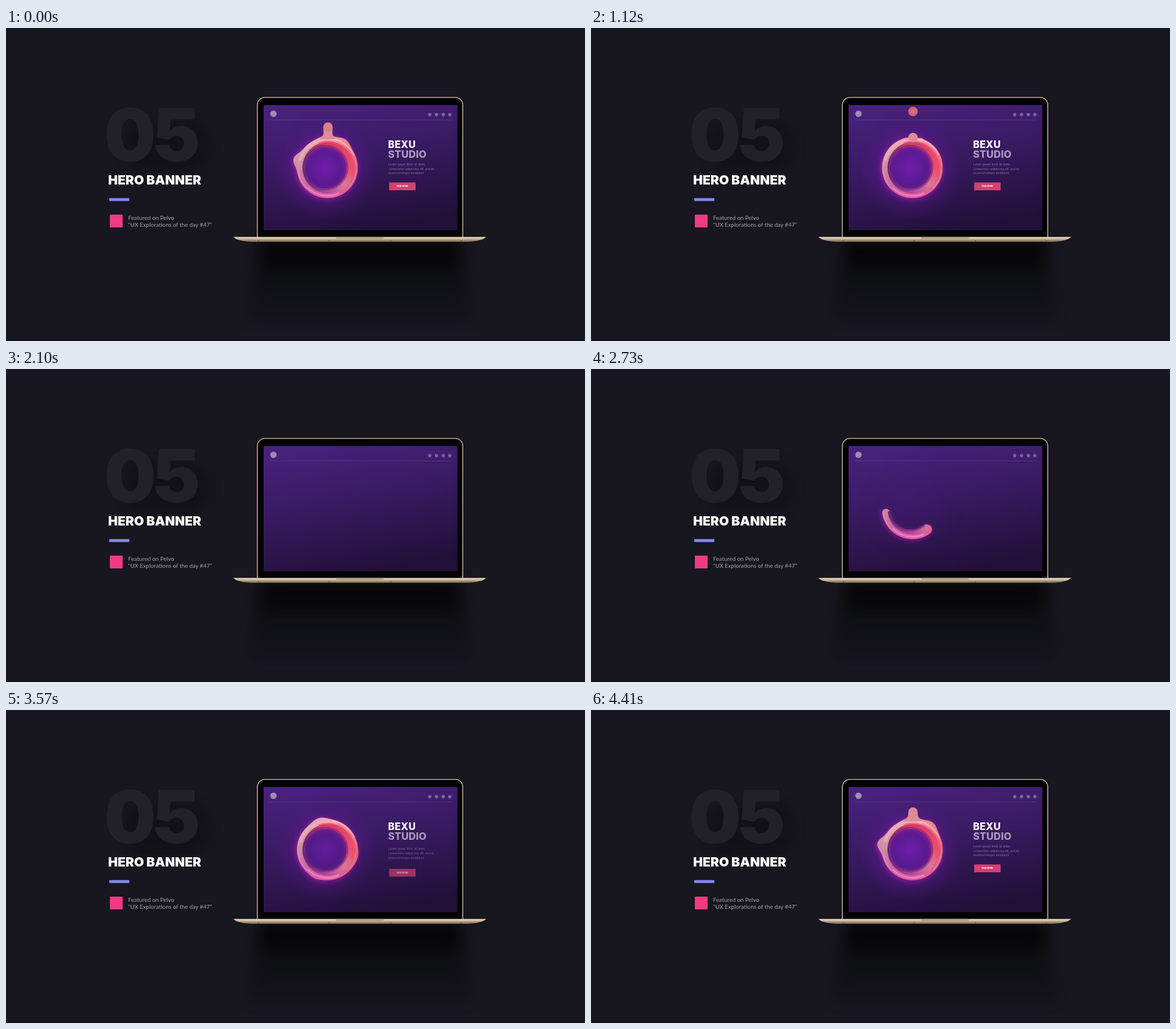
An HTML page with a canvas for the animation above (4.48 s loop, 998x540 px).

```html
<!DOCTYPE html>
<html lang="en">
<head>
<meta charset="utf-8">
<title>Hero banner</title>
<style>
  html, body { margin: 0; width: 100%; height: 100%; overflow: hidden; background: #18161f; }
  svg, canvas { position: absolute; left: 0; top: 0; }
  canvas { left: 444px; top: 133px; }
  text { font-family: Inter, sans-serif; }
  .note { font: 10px Lato, sans-serif; fill: #a3a1a6; }
  .bold { font-weight: 800; }
  .black { font-weight: 900; }
</style>
</head>
<body>
<svg width="998" height="540" viewBox="0 0 998 540">
  <defs>
    <linearGradient id="screen" x1=".3" y1="0" x2=".62" y2="1">
      <stop offset="0" stop-color="#48217b"/>
      <stop offset=".45" stop-color="#381a61"/>
      <stop offset="1" stop-color="#211037"/>
    </linearGradient>
    <linearGradient id="base" x1="0" y1="0" x2="0" y2="1">
      <stop offset="0" stop-color="#efe0c8"/>
      <stop offset=".4" stop-color="#cbb697"/>
      <stop offset="1" stop-color="#6b5d48"/>
    </linearGradient>
    <linearGradient id="fall" x1="0" y1="0" x2="0" y2="1">
      <stop offset="0" stop-color="#060609" stop-opacity=".95"/>
      <stop offset=".45" stop-color="#0d0e12" stop-opacity=".85"/>
      <stop offset="1" stop-color="#121217" stop-opacity=".6"/>
    </linearGradient>
    <filter id="soft" x="-30%" y="-60%" width="160%" height="220%" color-interpolation-filters="sRGB">
      <feGaussianBlur stdDeviation="10"/>
    </filter>
  </defs>

  <g filter="url(#soft)">
    <rect x="205" y="165" width="142" height="80" rx="30" fill="#0f1015" opacity=".7"/>
    <path d="M436 366H784L802 502H418z" fill="url(#fall)"/>
    <rect x="448" y="372" width="324" height="46" rx="16" fill="#050508" opacity=".6"/>
  </g>
  <rect y="538" width="998" height="2" fill="#100f15"/>

  <text class="black" x="169" y="230" font-size="126" letter-spacing="-5" fill="#22212a">05</text>
  <text class="black" x="176" y="270" font-size="22" fill="#fff">HERO BANNER</text>
  <rect x="178" y="293.5" width="34.5" height="5" fill="#8289f7"/>
  <rect x="179" y="322" width="22" height="22" rx="1" fill="#f03b82"/>
  <text class="note" x="210.5" y="331">Featured on Pelvo</text>
  <text class="note" x="210.5" y="342.5">“UX Explorations of the day #47”</text>

  <path d="M433.300 362V132.700a13 13 0 0 1 13-13H774.300a13 13 0 0 1 13 13V362z" fill="#020203" stroke="#c5ae90" stroke-width="1.6"/>
  <rect x="444" y="133" width="334" height="216" fill="url(#screen)"/>
  <path d="M392 360.500H827.500Q822 367 797 369H422Q397 367 392 360.500z" fill="url(#base)"/>
  <path d="M569 360.500H651V362Q651 363.500 649 363.500H571Q569 363.500 569 362z" fill="#b09b7d"/>
  <path d="M434 367h2M556 367h2M662 367h2M784 367h2" stroke="#4d4337"/>

  <circle cx="461" cy="148" r="5.5" fill="#9c8db3"/>
  <path d="M455 158.500H768" stroke="#8d78aa" stroke-opacity=".35" stroke-width=".8"/>
  <g fill="#78659a">
    <circle cx="730.500" cy="149.500" r="2.900"/>
    <circle cx="742" cy="149.500" r="2.900"/>
    <circle cx="753.700" cy="149.500" r="2.900"/>
    <circle cx="765" cy="149.500" r="2.900"/>
  </g>

  <g id="title" class="bold" font-size="17" letter-spacing=".2">
    <text x="658.500" y="206.500" fill="#fff">BEXU</text>
    <text x="658.500" y="223.500" fill="#a89cba">STUDIO</text>
  </g>
  <g id="copy" font-size="4.9" fill="#8a7aa2">
    <text x="659" y="237">Lorem ipsum dolor sit amet,</text>
    <text x="659" y="244.700">consectetur adipiscing elit, sed do</text>
    <text x="659" y="252.300">eiusmod tempor incididunt</text>
  </g>
  <g id="button">
    <rect x="660.500" y="266.500" width="45.500" height="13.500" fill="#d73f70"/>
    <text class="bold" x="683.300" y="274.300" font-size="3.300" fill="#fff" text-anchor="middle">READ MORE</text>
  </g>
</svg>
<canvas width="334" height="216"></canvas>

<script>
const LOOP = 4480, STEP = 70, CX = 554, CY = 241, START = 55;
const ctx = document.querySelector('canvas').getContext('2d');
const byId = id => document.getElementById(id);
const rad = deg => deg * Math.PI / 180;
const ramp = (t, from, to) => Math.min(1, Math.max(0, (t - from) / (to - from)));

// Linear interpolation through [time, value] pairs.
function track(t, ...keys) {
  let value = keys[0][1];
  for (let i = 1; i < keys.length; i++) {
    const [t0, v0] = keys[i - 1], [t1, v1] = keys[i];
    if (t >= t0) value = v0 + (v1 - v0) * ramp(t, t0, t1);
  }
  return value;
}

// Colours run clockwise from the right-hand side.
function conic(...colors) {
  const g = ctx.createConicGradient(0, CX, CY);
  colors.forEach((c, i) => g.addColorStop(i / colors.length, c));
  g.addColorStop(1, colors[0]);
  return g;
}

function radial(x, y, r, ...stops) {
  const g = ctx.createRadialGradient(x, y, 0, x, y, r);
  stops.forEach(([at, color]) => g.addColorStop(at, color));
  return g;
}

const skin = conic('#dd5573', '#e2628c', '#e45aa8', '#cf62a4', '#c98aa2', '#dfa3ae', '#eda3ac', '#ea7f8c');
const wall = conic('#e8506f', '#d9789c', '#b04a9c', '#7d3484', '#6b2e72', '#9c3568', '#d43a62', '#e2436a');

const point = (a, r) => [CX + r * Math.cos(rad(a)), CY + r * Math.sin(rad(a))];
const hole = a => 36.5 - 3 * Math.cos(rad(a));

function bump(a, center, width, height) {
  const d = (a - center + 540) % 360 - 180;
  return height * Math.exp(-d * d / (width * width));
}

// Ribbon between two radius functions, with round ends while it is open.
function band(a0, a1, inner, outer, fill) {
  ctx.beginPath();
  for (let a = a0; a <= a1; a += 1) ctx.lineTo(...point(a, outer(a)));
  for (let a = a1; a >= a0; a -= 1) ctx.lineTo(...point(a, inner(a)));
  ctx.closePath();
  if (a1 - a0 < 360) for (const a of [a0, a1]) {
    const [x, y] = point(a, (inner(a) + outer(a)) / 2), r = (outer(a) - inner(a)) / 2;
    ctx.moveTo(x + r, y);
    ctx.arc(x, y, r, 0, 7);
  }
  ctx.fillStyle = fill;
  ctx.fill();
}

function shine(a0, a1, from, to, r, color, width) {
  from = Math.max(a0, from);
  to = Math.min(a1, to);
  if (from >= to) return;
  ctx.beginPath();
  ctx.arc(CX, CY, r, rad(from), rad(to));
  ctx.strokeStyle = color;
  ctx.lineWidth = width;
  ctx.stroke();
}

// A bead swells out of the ring's top, pinches off and drifts upwards.
function bead(u, c) {
  const age = u - c;
  if (age < -280 || age > 830 || u > 6560) return;
  const y = 171 - (age < 0 ? age * .075 : age * .06);
  const neck = track(age, [-280, 10], [-70, 8], [0, 5], [35, 2], [80, 0]);
  const r = 8.2, x = CX + 1, fade = 1 - ramp(u, 6400, 6560);
  ctx.globalAlpha = fade;
  ctx.fillStyle = '#dd8b98';
  if (neck > 0) {
    ctx.beginPath();
    ctx.moveTo(x - r, y);
    ctx.bezierCurveTo(x - r, y + 10, x - neck, 183, x - neck - 9, 192);
    ctx.lineTo(x + neck + 9, 192);
    ctx.bezierCurveTo(x + neck, 183, x + r, y + 10, x + r, y);
    ctx.fill();
  }
  ctx.beginPath();
  ctx.arc(x, y, r, 0, 7);
  ctx.fill();
  ctx.globalAlpha = fade * ramp(age, -80, 150);
  ctx.fillStyle = radial(x, y, r, [0, '#c9788e'], [.65, '#cf6880'], [.85, '#ee5468'], [1, '#cf3a58']);
  ctx.fill();
  ctx.globalAlpha = 1;
}

function drawRing(u) {
  ctx.setTransform(1, 0, 0, 1, 0, 0);
  ctx.clearRect(0, 0, 334, 216);
  ctx.translate(-444, -133);

  const a1 = START + 360 * ramp(u, 2385, 3450);
  const a0 = START + 360 * ramp(u, 6160, 6520);

  ctx.globalAlpha = track(u, [2385, 0], [3220, .25], [3700, 1], [6160, 1], [6520, 0]);
  ctx.fillStyle = radial(CX - 4, CY, 92, [0, 'rgba(116,30,176,.95)'], [.35, 'rgba(90,26,146,.9)'],
    [.6, 'rgba(100,24,150,.45)'], [1, 'rgba(80,24,130,0)']);
  ctx.fillRect(444, 133, 334, 216);
  ctx.globalAlpha = 1;
  if (a1 <= START) return;

  if (a0 < a1) {
    // Swellings on both sides travel up towards the top.
    const left = track(u, [3400, 100], [3920, 142], [4410, 190], [5180, 243], [5600, 270]);
    const leftH = track(u, [3400, 0], [3920, 5], [4410, 9], [4480, 8], [5180, 4], [5600, 0]);
    const right = track(u, [3400, 385], [3920, 349], [4410, 307], [5000, 270]);
    const rightH = track(u, [3400, 0], [3920, 5], [4410, 6], [5000, 0]);
    const top = track(u, [3920, 255], [4200, 270]);
    const topH = track(u, [2900, 1], [3220, 3], [3920, 5], [4410, 4], [4700, 0]);
    const outer = a => 52.5 + bump(a, left, 13, leftH) + bump(a, right, 15, rightH) + bump(a, top, 16, topH);

    ctx.shadowColor = 'rgba(190,30,165,.7)';
    ctx.shadowBlur = 9;
    ctx.shadowOffsetX = -1.5;
    ctx.shadowOffsetY = 1.5;
    band(a0, a1, hole, outer, skin);
    ctx.shadowColor = 'transparent';
    band(a0, a1, hole, a => 44.5 + 1.5 * Math.cos(rad(a)), wall);
    band(a0, a1, hole, a => hole(a) + 2.5, 'rgba(92,28,104,.5)');

    ctx.filter = 'blur(.7px)';
    shine(a0, a1, 195, 290, 49, 'rgba(236,184,192,.6)', 5);
    shine(a0, a1, 280, 335, 50.5, 'rgba(250,205,210,.65)', 2.5);
    shine(a0, a1, 325, 405, 50, 'rgba(236,140,155,.55)', 2.5);
    shine(a0, a1, 65, 135, 48.5, 'rgba(250,150,205,.6)', 3);
    shine(a0, a1, 135, 195, 50.5, 'rgba(232,150,190,.6)', 2);
    shine(a0, a1, 250, 380, 44.5, 'rgba(250,70,110,.65)', 3.5);
    ctx.filter = 'none';
  }
  for (const c of [4480, 5150, 5840]) bead(u, c);
}

function reveal(id, t, from, to) {
  const p = t < 2240 ? 1 - ramp(t, 1750, 2030) : 1 - (1 - ramp(t, from, to)) ** 2;
  const el = byId(id);
  el.setAttribute('opacity', p);
  el.setAttribute('transform', `translate(0 ${t < 2240 ? 0 : 23 * (1 - p)})`);
}

const begin = performance.now();
function frame() {
  const elapsed = Math.max(0, performance.now() - begin) % LOOP;
  const t = Math.floor(elapsed / STEP) * STEP;
  drawRing(t < 2240 ? t + LOOP : t);
  reveal('title', t, 3080, 3640);
  reveal('copy', t, 3290, 3780);
  reveal('button', t, 3360, 3850);
  requestAnimationFrame(frame);
}
frame();
</script>
</body>
</html>
```
